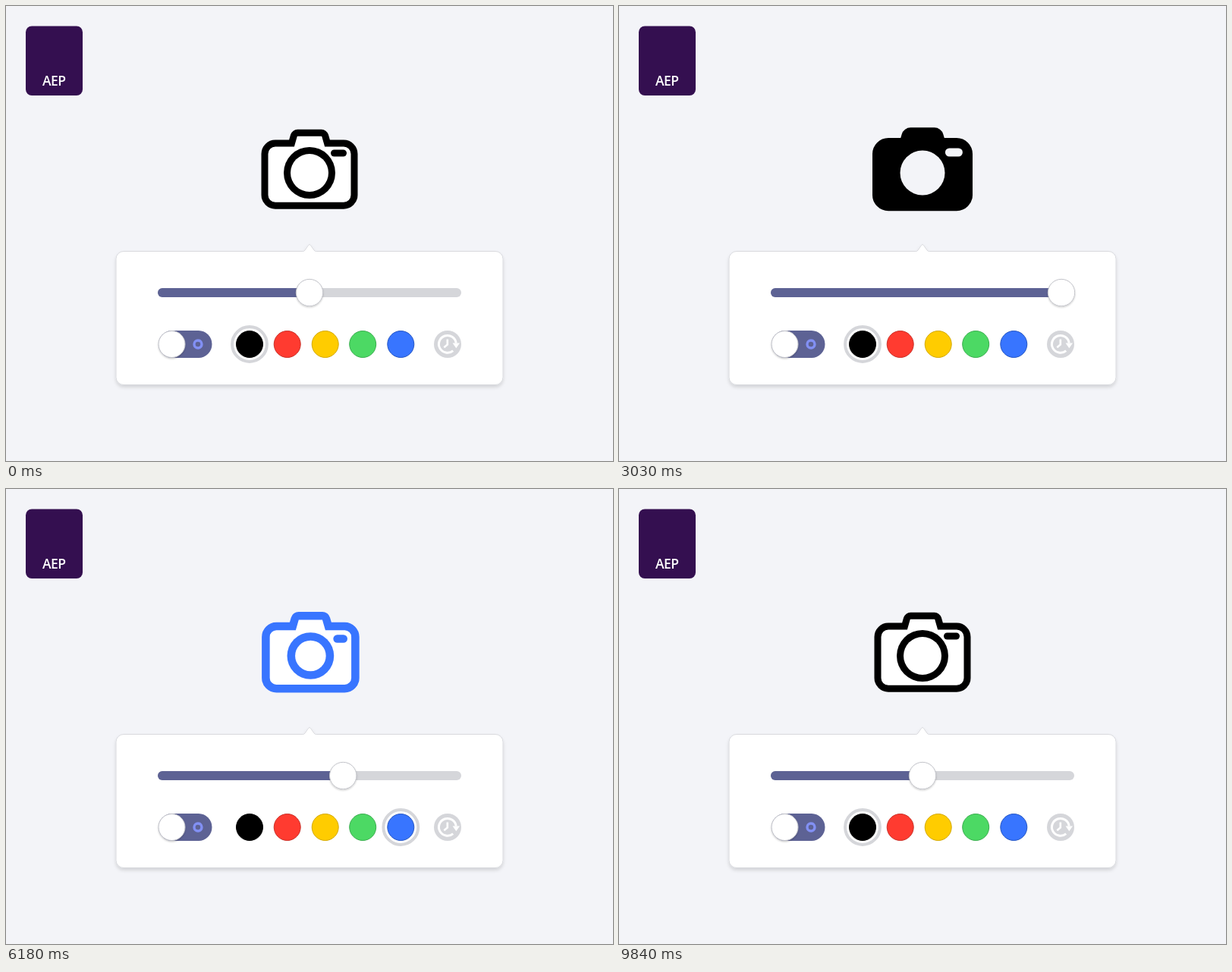
Recreate the animation shown at these times as an HTML page. Size 800 by 600 pixels, loop 9.9 s.

```html
<!DOCTYPE html>
<html lang="en">
<head>
<meta charset="utf-8">
<title>Icon controls</title>
<style>
  html, body { margin: 0; width: 100%; height: 100%; overflow: hidden; background: #f3f4f8; }
  svg { display: block; width: 800px; height: 600px; }
  text { font: 600 17.5px "Open Sans", "Noto Sans", sans-serif; }
</style>
</head>
<body>
<svg viewBox="0 0 800 600">
  <defs>
    <filter id="panelShadow" x="-5%" y="-10%" width="110%" height="125%">
      <feDropShadow dx="0" dy="3" stdDeviation="2" flood-color="#000" flood-opacity=".13"/>
    </filter>
    <filter id="knobShadow" x="-20%" y="-20%" width="140%" height="150%">
      <feDropShadow dx="0" dy="1.2" stdDeviation=".8" flood-color="#000" flood-opacity=".22"/>
    </filter>
  </defs>

  <rect x="26" y="26.5" width="75" height="91.5" rx="8" fill="#340f50"/>
  <text x="63.5" y="105" fill="#fff" text-anchor="middle" textLength="31" lengthAdjust="spacing">AEP</text>

  <g id="camera">
    <path id="body" stroke-miterlimit="8"/>
    <circle id="ring" cy="220"/>
    <circle id="lens" cy="220"/>
    <rect id="flash"/>
  </g>

  <path filter="url(#panelShadow)" fill="#fff" stroke="#d9dade" stroke-width="1"
    d="M155 323.5H391.5Q393 323.5 394 322L398.7 315.3Q400 313.6 401.3 315.3L406 322Q407 323.5 408.5 323.5H645A10 10 0 0 1 655 333.5V489.5A10 10 0 0 1 645 499.5H155A10 10 0 0 1 145 489.5V333.5A10 10 0 0 1 155 323.5Z"/>

  <rect x="200" y="372" width="400" height="12" rx="6" fill="#d5d6da"/>
  <rect id="bar" x="200" y="372" height="12" rx="6" fill="#5d6294"/>
  <circle id="knob" cy="378" r="17.7" fill="#fff" stroke="#c3c4ca" filter="url(#knobShadow)"/>

  <rect id="toggle" x="201" y="428" width="70.5" height="36" rx="18"/>
  <circle id="onMark" cx="253" cy="446" r="5" fill="none" stroke="#8290f4" stroke-width="3.4"/>
  <rect id="offMark" x="214.7" y="441.2" width="9" height="9" fill="#dfe1e6" stroke="#b1b9c6" stroke-width="3.4"/>
  <circle id="switchKnob" cy="446" r="17.5" fill="#fff" stroke="#c3c4ca" filter="url(#knobShadow)"/>

  <circle id="picker" cy="446" r="22.9" fill="#fff" stroke="#d5d6da" stroke-width="4"/>
  <g id="swatches"></g>

  <circle cx="582" cy="446" r="18" fill="#d5d6da"/>
  <g id="reset" fill="none" stroke="#fff" stroke-width="3">
    <path d="M589.2 454.6A11.4 11.4 0 1 1 593.2 444.5"/>
    <path d="M581.8 439.5V446.5L577.3 450.2" stroke-width="2.6"/>
    <path d="M588.6 444.6H598L593.3 451.2Z" fill="#fff" stroke="none"/>
  </g>
</svg>
<script>
const LOOP = 9900;
const BG = [243, 244, 248], WHITE = [255, 255, 255];
const COLORS = [[0, 0, 0], [255, 59, 48], [255, 204, 0], [76, 217, 100], [56, 117, 255]];
const EDGES = ['#000', '#c92f27', '#d3a800', '#3aad4e', '#2455c2'];
const SWATCH_X = [321, 370.7, 420.7, 470.2, 520.3];

// Each track: start value, then [start time, duration, new value]
const TRACKS = {
  knob: [400, [450, 690, 245.7], [1500, 1230, 583], [5550, 690, 441.7], [8730, 760, 400]],
  hue: [0, [3540, 1150, 1], [8730, 760, 0]],
  alt: [0, [5550, 690, 1], [8730, 760, 0]],
  sharp: [0, [6690, 720, 1], [8730, 760, 0]],
  spin: [0, [8730, 760, 360]]
};

// Slider position to line weight
const WEIGHTS = [[245.7, 3.2], [400, 9], [441.7, 10.5], [583, 14]];

const el = Object.fromEntries([...document.querySelectorAll('svg [id]')].map(n => [n.id, n]));
const set = (node, attrs) => { for (const k in attrs) node.setAttribute(k, attrs[k]); };
const clamp = v => Math.min(1, Math.max(0, v));
const mix = (a, b, p) => a + (b - a) * p;
const blend = (a, b, p) => a.map((v, i) => mix(v, b[i], p));
const css = c => `rgb(${c.map(Math.round)})`;
const ease = p => (1 - Math.cos(Math.PI * clamp(p))) / 2;

const valueAt = ([first, ...moves], t) =>
  moves.reduce((v, [start, span, to]) => mix(v, to, ease((t - start) / span)), first);

function weightAt(x) {
  const i = WEIGHTS.findIndex(([px]) => x <= px + 0.001);
  if (i < 1) return WEIGHTS[0][1];
  const [a, b] = [WEIGHTS[i - 1], WEIGHTS[i]];
  return mix(a[1], b[1], (x - a[0]) / (b[0] - a[0]));
}

function hueAt(p) {
  const i = Math.min(3, Math.floor(p * 4));
  return blend(COLORS[i], COLORS[i + 1], p * 4 - i);
}

// Closed polygon whose corners are rounded by quarter-like curves
function roundedPath(points) {
  const n = points.length;
  const toward = ([x, y], [u, v], d) => {
    const len = Math.hypot(u - x, v - y);
    return `${x + (u - x) * d / len} ${y + (v - y) * d / len}`;
  };
  return points.map((p, i) => {
    const prev = points[(i + n - 1) % n], next = points[(i + 1) % n], cut = p[2];
    const move = i ? 'L' : 'M';
    if (cut < 0.05) return `${move}${p[0]} ${p[1]}`;
    // Weighted handles approximate a circular corner
    const k = cut * 0.45;
    return `${move}${toward(p, prev, cut)}C${toward(p, prev, k)} ${toward(p, next, k)} ${toward(p, next, cut)}`;
  }).join('') + 'Z';
}

function drawCamera(s, color) {
  const w = weightAt(s.knob);
  const fill = ease((s.knob - 505) / 76);
  const dx = 1.4 * s.alt;
  const R = 14 * (1 - s.sharp), r = 3.8 * (1 - s.sharp);
  const ink = css(color);

  const outline = [
    [341, 181, R], [376.5, 181, 0], [380.5, 167.2, r], [419.5, 167.2, r],
    [423.5, 181, 0], [459, 181, R], [459, 263.2, R], [341, 263.2, R]
  ].map(([x, y, c]) => [x + dx, y, c]);
  set(el.body, {
    d: roundedPath(outline), stroke: ink, 'stroke-width': w,
    fill: css(blend(WHITE, color, fill))
  });

  const radius = mix(29.5, 25.5, s.alt);
  set(el.ring, { cx: 400 + dx, r: radius + w / 2, fill: ink });
  set(el.lens, {
    cx: 400 + dx, r: radius - w / 2 * (1 - fill),
    fill: css(blend(WHITE, BG, fill))
  });

  const h = mix(w, 11, fill);
  const len = mix(mix(12, 8, s.alt), 12, fill) + h;
  const cx = mix(mix(438.5, 440.7, s.alt), 441.4, fill);
  const cy = mix(mix(194, 197.5, s.alt), 193, fill);
  set(el.flash, {
    x: cx - len / 2, y: cy - h / 2, width: len, height: h,
    rx: h / 2 * (1 - s.sharp), fill: css(blend(color, BG, fill))
  });
}

function draw(t) {
  const s = {};
  for (const name in TRACKS) s[name] = valueAt(TRACKS[name], t);
  drawCamera(s, hueAt(s.hue));

  set(el.bar, { width: s.knob - 200 });
  set(el.knob, { cx: s.knob });
  set(el.toggle, { fill: css(blend([93, 98, 148], [213, 214, 218], s.sharp)) });
  set(el.onMark, { opacity: 1 - s.sharp });
  set(el.offMark, { opacity: s.sharp });
  set(el.switchKnob, { cx: mix(218.5, 253.7, s.sharp) });
  set(el.picker, { cx: mix(SWATCH_X[0], SWATCH_X[4], s.hue) });
  set(el.reset, { transform: `rotate(${s.spin} 582 446)` });
}

el.swatches.innerHTML = SWATCH_X.map((x, i) =>
  `<circle cx="${x}" cy="446" r="17.5" fill="${css(COLORS[i])}" stroke="${EDGES[i]}"/>`).join('');

const begin = performance.now();
function tick() {
  draw((performance.now() - begin) % LOOP);
  requestAnimationFrame(tick);
}
tick();
</script>
</body>
</html>
```
